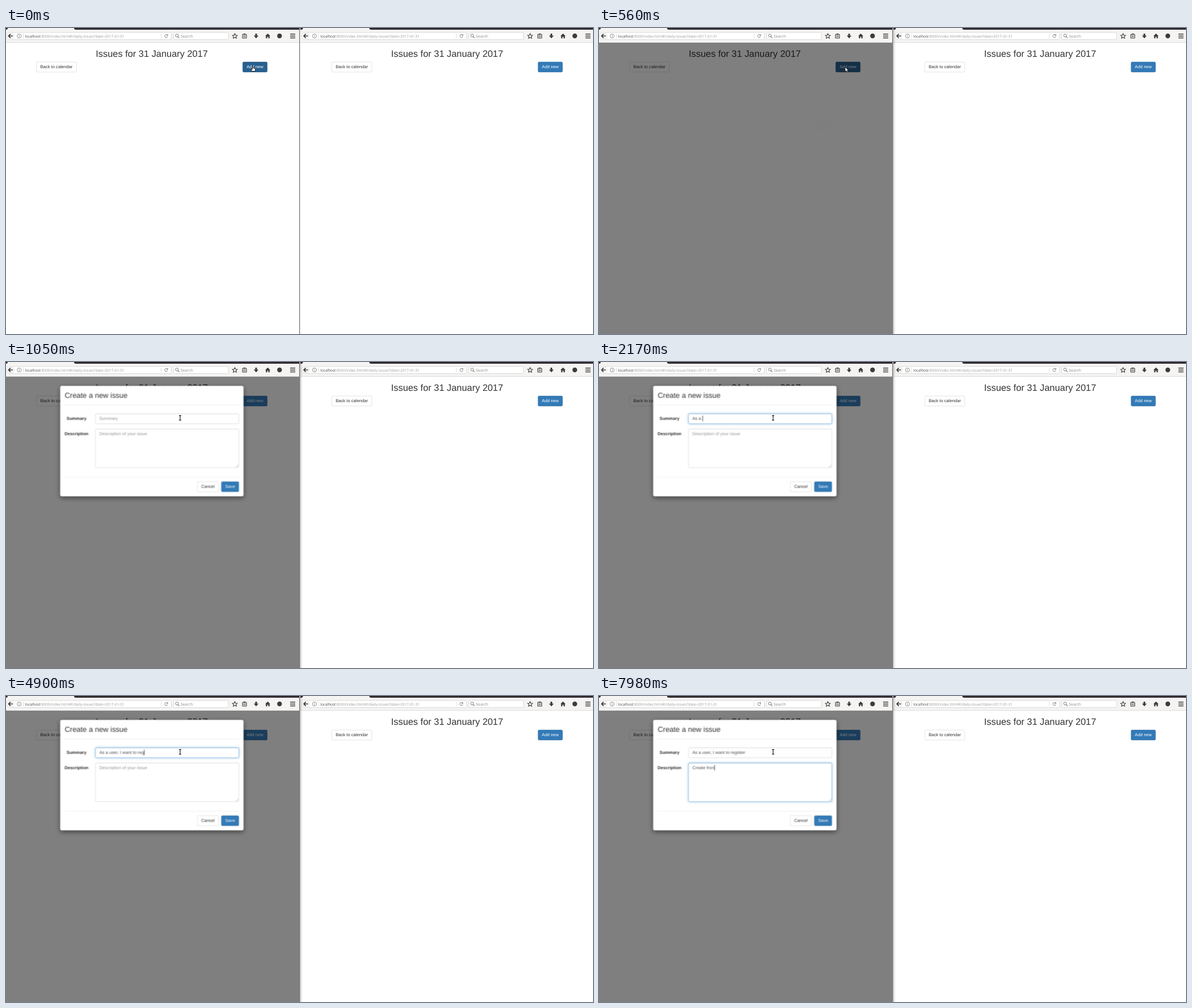
An HTML page for the animation above (8000 ms loop, 1035x541 px).

```html
<!DOCTYPE html>
<html lang="en">
<head>
<meta charset="utf-8">
<title>Daily issues</title>
<style>
  html, body { margin: 0; width: 100%; height: 100%; overflow: hidden; background: #fff; }
  body { position: relative; text-rendering: geometricPrecision; }
  body * { box-sizing: border-box; }
  .abs, .page, .page *, .modal > * { position: absolute; margin: 0; }

  /* Page content is laid out at full size and scaled down */
  .scaled {
    position: absolute; left: 0; top: 0; width: 0; height: 0;
    transform: scale(.539); transform-origin: 0 0;
    font: 14.2px "Liberation Sans", Arial, sans-serif; color: #333;
  }
  .page { top: 0; left: 0; width: 954px; }
  .page.right { left: 966px; }
  h2 { top: 69px; left: 0; width: 954px; text-align: center; font-size: 30.4px; font-weight: normal; line-height: 33px; }
  .btn {
    height: 34px; line-height: 32px; text-align: center; white-space: nowrap;
    border: 1px solid #ccc; border-radius: 4px; background: #fff;
  }
  .primary { color: #fff; background: #337ab7; border-color: #2e6da4; }
  .back { left: 99px; top: 111px; width: 132px; }
  .add { left: 774px; top: 111px; width: 81px; }

  .chrome { left: 0; top: 0; width: 1035px; height: 541px; }
  .divider { left: 517px; top: 0; width: 2px; height: 541px; background: linear-gradient(90deg, #777 50%, #d4d4d4 50%); }
  .backdrop { left: 0; top: 26px; width: 517px; height: 515px; background: rgba(0, 0, 0, .5); }
  .edge { left: 518px; top: 3px; width: 5px; height: 538px; background: linear-gradient(90deg, rgba(0, 0, 0, .2), transparent); }

  .modal {
    position: absolute; left: 177px; top: 78px; width: 600px; height: 363px;
    background: #fff; border-radius: 6px;
    box-shadow: 0 0 0 1px rgba(0, 0, 0, .2), 0 5px 15px rgba(0, 0, 0, .5);
  }
  h3 { left: 15px; top: 19px; font-size: 24px; font-weight: normal; line-height: 27px; white-space: nowrap; }
  .rule { left: 15px; width: 570px; height: 1px; background: #e5e5e5; }
  .label { left: 4px; width: 99px; line-height: 20px; text-align: center; font-weight: bold; }
  .field {
    left: 115px; width: 470px; padding: 6px 12px; font-size: 14.3px; line-height: 20px; white-space: pre; color: #555;
    border: 1px solid #ccc; border-radius: 4px; box-shadow: inset 0 1px 1px rgba(0, 0, 0, .075);
  }
  .field.summary { top: 91px; height: 34px; }
  .field.description { top: 141px; height: 128px; }
  .ring {
    position: absolute; inset: -1px; border: 1px solid #66afe9; border-radius: 4px;
    box-shadow: inset 0 1px 1px rgba(0, 0, 0, .075), 0 0 8px rgba(102, 175, 233, .6);
  }
  .caret { display: inline-block; width: 2px; height: 18px; margin: -4px -2px 0 0; vertical-align: -4px; background: #555; }
  .hint { color: #999; }
  .grip { position: absolute; right: 0; bottom: 0; width: 11px; height: 11px; }

  .cursor { left: 0; top: 0; width: 12px; height: 14px; overflow: visible; }
  .cursor path { stroke-linejoin: round; }

  .chrome-text { font-family: "Open Sans", "Noto Sans", sans-serif; }

  /* One loop, held between stops */
  .backdrop, .edge { animation: dim 8s step-end infinite; }
  .modal { animation: drop 8s step-end infinite; }
  .hover { animation: unhover 8s step-end infinite; }
  .summary .ring { animation: focus-summary 8s step-end infinite; }
  .description .ring { animation: focus-description 8s step-end infinite; }
  .cursor { animation: move 8s step-end infinite; }
  .hand { animation: hand 8s step-end infinite; }
  .arrow { animation: arrow 8s step-end infinite; }
  .beam { animation: beam 8s step-end infinite; }

  @keyframes dim {
    0% { opacity: 0; } 4.375% { opacity: .1; } 5.25% { opacity: .5; }
    6.125% { opacity: .9; } 7%, 100% { opacity: 1; }
  }
  @keyframes drop {
    0% { opacity: 0; transform: translateY(-91px); }
    7% { opacity: .006; transform: translateY(-89px); }
    7.875% { opacity: .5; transform: translateY(-56px); }
    8.75% { opacity: 1; transform: translateY(-29px); }
    9.625% { opacity: 1; transform: translateY(-9px); }
    10.5%, 100% { opacity: 1; transform: none; }
  }
  @keyframes unhover {
    0% { background: #286090; border-color: #204d74; }
    9.625%, 100% { background: #337ab7; border-color: #2e6da4; }
  }
  @keyframes focus-summary {
    0% { opacity: 0; } 16.625% { opacity: .2; } 17.5% { opacity: .65; } 18.375% { opacity: 1; }
    71.75% { opacity: .5; } 72.625%, 100% { opacity: 0; }
  }
  @keyframes focus-description {
    0% { opacity: 0; } 71.75% { opacity: .5; } 72.625%, 100% { opacity: 1; }
  }
  @keyframes move {
    0% { transform: translate(435px, 67px); }
    4.375% { transform: translate(434px, 69px); }
    8.75% { transform: translate(428px, 73px); }
    9.625% { transform: translate(385px, 82px); }
    10.5% { transform: translate(318px, 97px); }
    13.125%, 100% { transform: translate(307px, 99px); }
  }
  @keyframes hand { 0% { opacity: 1; } 4.375%, 100% { opacity: 0; } }
  @keyframes arrow { 0% { opacity: 0; } 4.375% { opacity: 1; } 10.5%, 100% { opacity: 0; } }
  @keyframes beam { 0% { opacity: 0; } 10.5%, 100% { opacity: 1; } }
</style>
</head>
<body>

<div class="scaled">
  <div class="page">
    <h2>Issues for 31 January 2017</h2>
    <div class="btn back">Back to calendar</div>
    <div class="btn primary add hover">Add new</div>
  </div>
  <div class="page right">
    <h2>Issues for 31 January 2017</h2>
    <div class="btn back">Back to calendar</div>
    <div class="btn primary add">Add new</div>
  </div>
</div>

<svg class="abs chrome" viewBox="0 0 1035 541">
  <defs>
    <g id="bar">
      <rect x="-3" width="520" height="26" fill="#f5f4f3"/>
      <rect x="-3" y="25" width="520" height="1" fill="#dedddc"/>
      <path d="M-3 0H3V1Q2.500 3 0 3H-3ZM120 0H517V3H123Q120.500 3 120 1Z" fill="#2f2a2e"/>
      <g fill="#fff" stroke="#d2d1d0" stroke-width=".8">
        <rect x="10" y="8" width="281.500" height="12.500" rx="1.500"/>
        <rect x="295.500" y="8" width="96.500" height="12.500" rx="1.500"/>
      </g>
      <circle cx="7.500" cy="14" r="6.600" fill="#f8f8f7" stroke="#d2d1d0" stroke-width=".6"/>
      <path d="M30.500 10V18.500M273.500 10V18.500" stroke="#d5d5d5" stroke-width=".8"/>
      <g fill="none" stroke="#3c3c3c" stroke-width="1.700">
        <path d="M8 10.300L4.500 14L8 17.700M4.800 14H12"/>
        <path d="M501 10.800H510M501 14.200H510M501 17.600H510" stroke-width="1.500"/>
      </g>
      <g fill="none" stroke="#777" stroke-width=".8">
        <circle cx="23.300" cy="14.200" r="3.600"/>
        <path d="M23.300 13.500V16.300M23.300 11.900V12.800"/>
        <path d="M284.600 12.600A2.700 2.700 0 1 0 284.900 15.200M285.100 11V13.200H282.800" stroke-width="1"/>
        <circle cx="301.300" cy="13.300" r="2.500" stroke-width="1"/>
        <path d="M303.100 15.200L305.500 17.800" stroke-width="1.200"/>
      </g>
      <path d="M403.500 9.900L404.800 12.700L407.800 13L405.600 15.100L406.200 18.100L403.500 16.600L400.800 18.100L401.400 15.100L399.200 13L402.200 12.700Z"
        fill="none" stroke="#3c3c3c" stroke-width="1.100"/>
      <g fill="none" stroke="#3c3c3c">
        <rect x="417" y="11.300" width="7" height="6.700" rx=".6" stroke-width="1.100"/>
        <path d="M418.700 10.700H422.300" stroke-width="1.600"/>
        <path d="M418.500 13.700H422.500M418.500 15.700H422.500" stroke-width=".9"/>
      </g>
      <path d="M439.500 10H442.500V13.500H445.200L441 18.300L436.800 13.500H439.500Z" fill="#3c3c3c"/>
      <path d="M461.500 9.700L466 14.200H464.800V18.300H462.500V15.500H460.500V18.300H458.200V14.200H457Z" fill="#3c3c3c"/>
      <circle cx="482.300" cy="14" r="4.200" fill="#3c3c3c"/>
      <g class="chrome-text" fill="#999">
        <text x="33.700" y="16.600" font-size="6.470"><tspan fill="#444">localhost</tspan>:8000/index.html#!/daily-issues?date=2017-01-31</text>
        <text x="308" y="16.600" font-size="6.800" fill="#8a8a8a">Search</text>
      </g>
    </g>
  </defs>
  <use href="#bar"/>
  <use href="#bar" x="520.6"/>
</svg>

<div class="abs backdrop"></div>
<div class="abs divider"></div>
<div class="abs edge"></div>

<div class="scaled">
  <div class="modal">
    <h3>Create a new issue</h3>
    <div class="rule" style="top:62px"></div>
    <div class="label" style="top:98px">Summary</div>
    <div class="field summary"><div class="ring"></div><span class="typed"></span><i class="caret"></i><span class="hint">Summary</span></div>
    <div class="label" style="top:148px">Description</div>
    <div class="field description"><div class="ring"></div><span class="typed"></span><i class="caret"></i><span class="hint">Description of your issue</span><svg class="grip" viewBox="0 0 6 6"><path d="M1 5.500L5.500 1M3.500 5.500L5.500 3.500" stroke="#aaa" stroke-width=".7"/></svg></div>
    <div class="rule" style="top:299px"></div>
    <div class="btn" style="left:448px;top:314px;width:71px">Cancel</div>
    <div class="btn primary" style="left:527px;top:314px;width:58px">Save</div>
  </div>
</div>

<svg class="abs cursor" viewBox="0 0 12 14">
  <g class="hand">
    <path d="M-.8 .8Q0 -.2 .8 .8V3.800L4 4.500Q5 4.800 4.800 6L4.200 9.500H-.8L-3 6.300Q-3.200 5 -2 5.300L-.8 6.300Z" fill="#fff" stroke="#111" stroke-width=".9"/>
  </g>
  <g class="arrow">
    <path d="M0 0V8.300L2 6.500L3.300 9.400L4.700 8.800L3.400 6H6Z" fill="#fff" stroke="#111" stroke-width=".8"/>
  </g>
  <g class="beam" fill="none">
    <path d="M-2 -4.300H2M0 -4.300V3.800M-2 3.800H2" stroke="#fff" stroke-width="2.200"/>
    <path d="M-2 -4.300H2M0 -4.300V3.800M-2 3.800H2" stroke="#222" stroke-width="1.200"/>
  </g>
</svg>

<script>
  const LOOP = 8000, TICK = 70;

  // Bursts of typing: text, time of the first key, time of the last key
  const fields = [
    { name: "summary", from: 1330, to: 5740, bursts: [
      ["As a ", 1610, 2170], ["user, I", 2450, 3360], [" want to ", 3500, 4340],
      ["reg", 4550, 4900], ["ister", 4970, 5530]] },
    { name: "description", from: 5740, to: LOOP, bursts: [
      ["C", 6090, 6090], ["reat", 6300, 6720], ["e ", 6860, 7000], ["fron", 7490, 7980]] }
  ];

  for (const f of fields) {
    const find = part => document.querySelector(`.${f.name} .${part}`);
    f.typed = find("typed");
    f.caret = find("caret");
    f.hint = find("hint");
    f.keys = f.bursts.flatMap(([text, first, last]) => [...text].map((char, i) => {
      const time = first + i * (last - first) / (text.length - 1 || 1);
      return { char, time: Math.round(time / TICK) * TICK };
    }));
  }

  function draw(t) {
    for (const f of fields) {
      const text = f.keys.filter(k => k.time <= t).map(k => k.char).join("");
      if (f.typed.textContent !== text) f.typed.textContent = text;
      f.caret.style.visibility = t >= f.from && t < f.to ? "visible" : "hidden";
      f.hint.style.display = text ? "none" : "inline";
    }
  }

  let start;
  function step(now) {
    start ??= now;
    draw((now - start) % LOOP);
    requestAnimationFrame(step);
  }
  draw(0);
  requestAnimationFrame(step);
</script>
</body>
</html>
```
